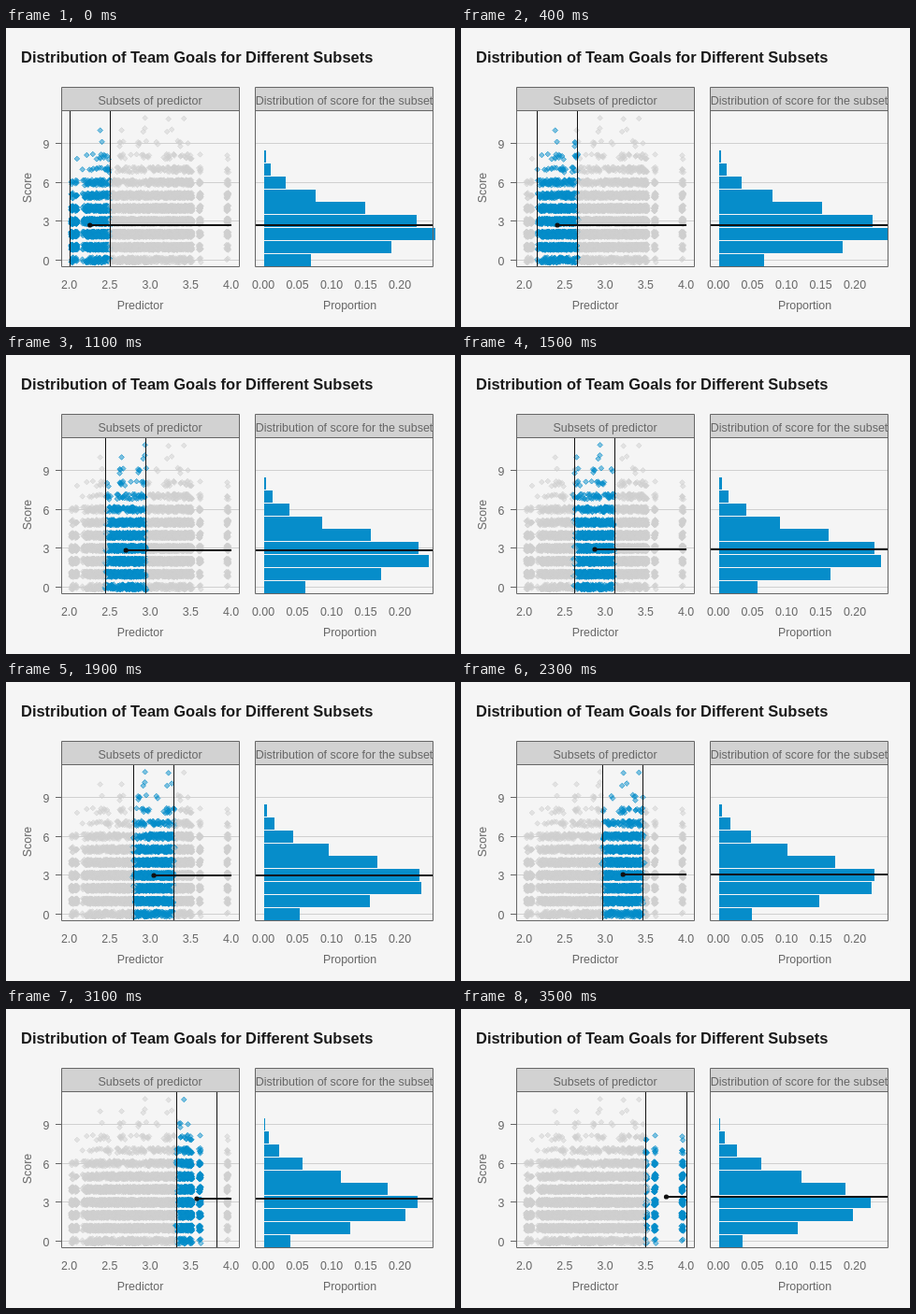
Recreate the animation shown at these times as an HTML page with a canvas. Size 480x320 px, loop 5000 ms.

```html
<!DOCTYPE html>
<html lang="en">
<head>
<meta charset="utf-8">
<title>Team goals by subset</title>
<style>
  html, body { margin: 0; width: 100%; height: 100%; overflow: hidden; background: #f5f5f5; }
  canvas, svg { position: absolute; left: 0; top: 0; width: 480px; height: 320px; }
  text { font: 12.4px "Liberation Sans", Arial, sans-serif; fill: #666; text-anchor: middle; }
  .title { font-size: 16.47px; font-weight: bold; fill: #1a1a1a; text-anchor: start; }
  .strip-label { font-size: 12.5px; }
  .y { text-anchor: end; }
  .strip { fill: #d2d2d2; }
  .frame { fill: none; stroke: #666; }
  .tick { stroke: #666; }
  .bar { fill: #068dca; }
  .edge { stroke: #111; }
  .mean { stroke: #111; stroke-width: 2; }
</style>
</head>
<body>
<canvas id="plot" width="480" height="320"></canvas>
<svg id="chart" viewBox="0 0 480 320">
  <defs>
    <clipPath id="stripClip"><rect x="267" y="64" width="189" height="24"/></clipPath>
  </defs>
  <text class="title" x="16" y="37">Distribution of Team Goals for Different Subsets</text>
  <rect class="strip" x="59.5" y="63.5" width="190" height="25"/>
  <rect class="strip" x="266.5" y="63.5" width="190" height="25"/>
  <text class="strip-label" x="154" y="82">Subsets of predictor</text>
  <text class="strip-label" x="361.5" y="82" clip-path="url(#stripClip)">Distribution of score for the subset</text>
  <text x="143.5" y="301">Predictor</text>
  <text x="367.5" y="301">Proportion</text>
  <text transform="translate(27 171) rotate(-90)">Score</text>
  <g id="axes"></g>
  <g id="bars"></g>
  <line id="low" class="edge" y1="89" y2="255"/>
  <line id="high" class="edge" y1="89" y2="255"/>
  <line id="meanLeft" class="mean" x2="241"/>
  <line id="meanRight" class="mean" x1="267" x2="456"/>
  <circle id="dot" r="2.6" fill="#111"/>
  <path class="frame" d="M59.5 63.5h190v192h-190zM59.5 88.5h190M266.5 63.5h190v192h-190zM266.5 88.5h190"/>
</svg>
<script>
const LOOP = 5000, STEP = 100, LAST = 35;
const WIDTH = 0.5, TRAVEL = 1.5, POINTS = 8000;
const BAR_LEFT = 276, BAR_SCALE = 726;
const gridScores = [0, 3, 6, 9];

const $ = id => document.getElementById(id);
const ctx = $("plot").getContext("2d");
const px = value => 68.1 + 86.5 * (value - 2);
const py = score => 248.45 - 13.84 * score;
const crisp = position => Math.floor(position) + 0.5;

let seed = 7;
function random() {
  seed = (seed * 1664525 + 1013904223) % 4294967296;
  return seed / 4294967296;
}
const spread = r => (random() * 2 - 1) * r;

// expected score for a subset centred on a predictor value
function meanScore(center) {
  const t = center - 2.25;
  return 2.7 + 0.22 * t + 0.17 * t * t;
}

// Poisson share of a score, with a slightly shortened tail
function share(score, mean) {
  let p = Math.exp(-mean);
  for (let k = 1; k <= score; k++) p *= mean / k;
  return 1.03 * p * (1 - (score / 9.5) ** 4);
}

function sampleScore(mean) {
  const limit = Math.exp(-mean);
  let score = 0;
  for (let p = random(); p > limit; p *= random()) score++;
  return score;
}

const columns = [2.03, 2.08, 3.5, 3.61, 3.95];
function makePoint() {
  const inColumn = random() < 0.11;
  const value = inColumn
    ? columns[Math.floor(random() * columns.length)]
    : 2.17 + 1.33 * random() ** 0.85;
  const score = Math.min(11, sampleScore(meanScore(value)));
  return { value, x: px(value) + spread(inColumn ? 1.2 : 2), y: py(score) + spread(3) };
}
const points = Array.from({ length: POINTS }, makePoint);

function drawPoint({ x, y }) {
  ctx.beginPath();
  ctx.moveTo(x, y - 2.8);
  ctx.lineTo(x + 2.8, y);
  ctx.lineTo(x, y + 2.8);
  ctx.lineTo(x - 2.8, y);
  ctx.closePath();
  ctx.fill();
  ctx.stroke();
}

function drawScatter(low) {
  ctx.clearRect(0, 0, 480, 320);
  ctx.fillStyle = "#d0d0d0";
  for (const score of gridScores) {
    const y = Math.floor(py(score));
    ctx.fillRect(60, y, 189, 1);
    ctx.fillRect(267, y, 189, 1);
  }
  ctx.lineWidth = 0.8;
  for (const point of points) {
    const inside = point.value >= low && point.value <= low + WIDTH;
    const rgb = inside ? "6,141,202" : "208,208,208";
    ctx.fillStyle = `rgba(${rgb},.5)`;
    ctx.strokeStyle = `rgba(${rgb},.8)`;
    drawPoint(point);
  }
}

function set(el, attrs) {
  for (const name in attrs) el.setAttribute(name, attrs[name]);
}
function add(parent, tag, attrs, content = "") {
  const el = document.createElementNS("http://www.w3.org/2000/svg", tag);
  set(el, attrs);
  el.textContent = content;
  return parent.appendChild(el);
}

for (let i = 0; i < 5; i++) {
  const value = 2 + i / 2;
  add($("axes"), "text", { x: px(value) - 0.6, y: 279 }, value.toFixed(1));
  add($("axes"), "text", { x: 275 + 36.5 * i, y: 279 }, (i * 0.05).toFixed(2));
}
for (const score of gridScores) {
  const y = crisp(py(score));
  add($("axes"), "line", { class: "tick", x1: 53, x2: 59, y1: y, y2: y });
  add($("axes"), "text", { class: "y", x: 46.5, y: y + 5 }, score);
}
const bars = Array.from({ length: 10 }, (_, score) => add($("bars"), "rect", {
  class: "bar", x: BAR_LEFT, y: Math.round(py(score + 0.5) + 0.3), height: 13
}));

function render(step) {
  const low = 2 + TRAVEL * (step / LAST) ** 1.05;
  const center = low + WIDTH / 2;
  const mean = meanScore(center);
  const left = crisp(px(low)), right = crisp(px(low + WIDTH));
  const y = Math.round(py(mean));
  drawScatter(low);
  bars.forEach((bar, score) => set(bar, { width: Math.round(BAR_SCALE * share(score, mean)) }));
  set($("low"), { x1: left, x2: left });
  set($("high"), { x1: right, x2: right });
  set($("meanLeft"), { x1: px(center), y1: y, y2: y });
  set($("meanRight"), { y1: y, y2: y });
  set($("dot"), { cx: px(center), cy: y });
}

const began = performance.now();
let shown = -1;
function tick() {
  const time = (performance.now() - began) % LOOP;
  const step = Math.min(LAST, Math.floor(time / STEP));
  if (step !== shown) render(shown = step);
  requestAnimationFrame(tick);
}
tick();
</script>
</body>
</html>
```
